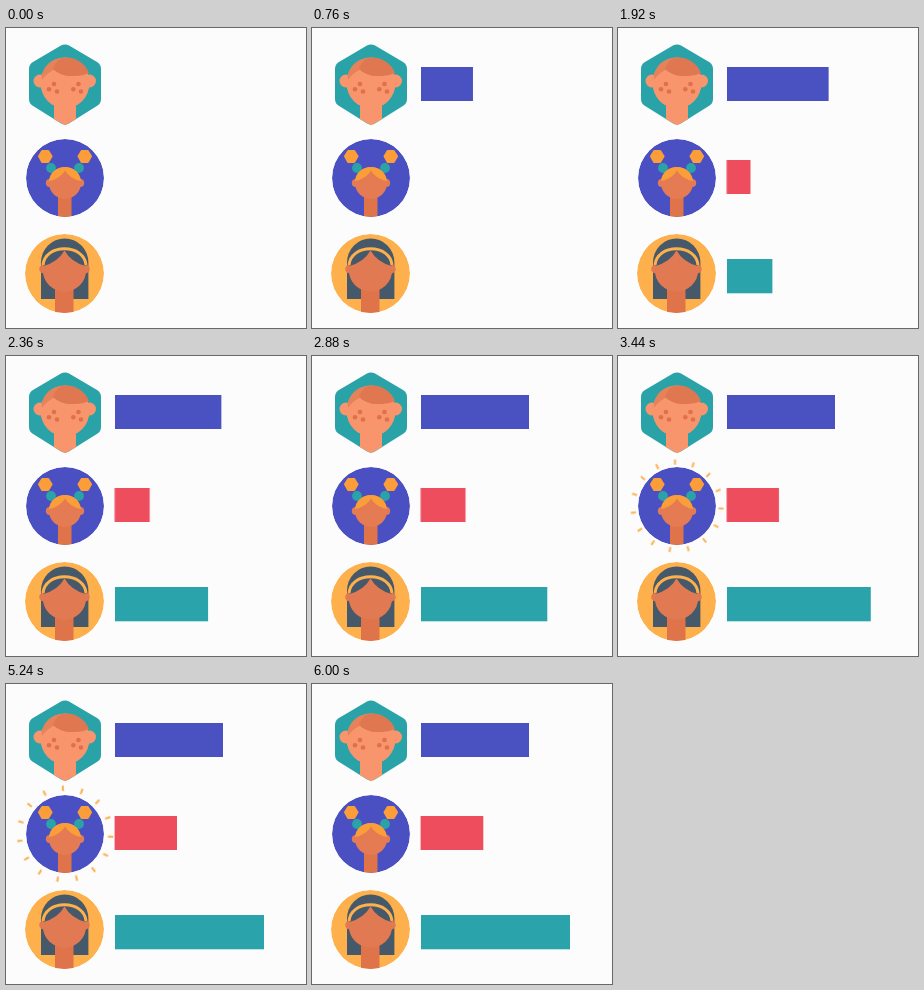
These frames come from a looping animation (300x300 px, 6040 ms). An HTML page:

```html
<!DOCTYPE html>
<html lang="en">
<head>
<meta charset="utf-8">
<title>Avatar bar chart</title>
<style>
  html, body { margin: 0; width: 100%; height: 100%; overflow: hidden; background: #fcfcfc; }
  svg { display: block; width: 100%; height: 100%; }

  .bar, .rays { animation: 6040ms linear infinite both; }
  .bar { transform-box: fill-box; transform-origin: left; }
  .blue { fill: #4a52c2; animation-name: grow-blue; }
  .red { fill: #ee4d5d; animation-name: grow-red; }
  .teal { fill: #2aa3ab; animation-name: grow-teal; }
  .rays {
    fill: none; stroke: #fbb254; stroke-width: 5.2; stroke-dasharray: 1.1 8.9;
    transform-origin: 59px 150px; animation-name: shine;
  }

  @keyframes grow-blue {
    0% { transform: scaleX(0); }
    4.967% { transform: scaleX(0); animation-timing-function: cubic-bezier(.16, .27, .14, 1); }
    47.68%, 100% { transform: scaleX(1); }
  }
  @keyframes grow-red {
    0% { transform: scaleX(0); }
    14.57% { transform: scaleX(0); animation-timing-function: cubic-bezier(.17, .02, .24, 1); }
    94.04%, 100% { transform: scaleX(1); }
  }
  @keyframes grow-teal {
    0% { transform: scaleX(0); }
    23.68% { transform: scaleX(0); animation-timing-function: cubic-bezier(.17, 0, .25, 1); }
    66.72%, 100% { transform: scaleX(1); }
  }
  /* Rays emerge from behind the disc, pulse, then retreat. */
  @keyframes shine {
    0%, 49.67%, 96.03%, 100% { transform: scale(.8) rotate(2deg); }
    52.81%, 61.09%, 69.37%, 77.65%, 85.93%, 94.21% {
      transform: scale(1.04) rotate(2deg); animation-timing-function: ease-in-out;
    }
    56.95%, 65.23%, 73.51%, 81.79%, 90.07% {
      transform: scale(1) rotate(2deg); animation-timing-function: ease-in-out;
    }
  }
</style>
</head>
<body>
<svg viewBox="0 0 300 300">
  <defs>
    <clipPath id="disc-mid"><circle cx="59" cy="150" r="39"/></clipPath>
    <clipPath id="disc-low"><circle cx="58.5" cy="245.5" r="39.5"/></clipPath>
  </defs>

  <rect class="bar blue" x="109" y="39" width="108" height="34"/>
  <rect class="bar red" x="108.6" y="132" width="62.7" height="34"/>
  <rect class="bar teal" x="109" y="231" width="149" height="34.3"/>

  <!-- Hexagon avatar -->
  <g fill="#f8956d">
    <path d="M59 24.5 87 41V71L59 88.5 31 71V41Z" fill="#2aa3a8" stroke="#2aa3a8" stroke-width="16" stroke-linejoin="round"/>
    <path d="M48 70V91.3L59 97.3 70 91.3V70Z"/>
    <circle cx="34" cy="53" r="6.5"/>
    <circle cx="83.5" cy="53" r="6.5"/>
    <ellipse cx="59" cy="55" rx="24.5" ry="25.5"/>
    <path d="M36 51.5C35 41 44 29.5 59 29.5L49 41Q41 45 36 51.5Z" fill="#e5825a"/>
    <path d="M47 41Q55 49 68 48 77 48 83 45C79 35 70 29 59 29.5 53 30 49 35 47 41Z" fill="#df7750"/>
    <g fill="#df7048">
      <circle cx="48" cy="56" r="2.3"/><circle cx="43" cy="61.3" r="2.3"/><circle cx="51" cy="63.5" r="2.3"/>
      <circle cx="72.5" cy="56" r="2.3"/><circle cx="67.3" cy="61.3" r="2.3"/><circle cx="75" cy="63.5" r="2.3"/>
    </g>
  </g>

  <!-- Avatar with buns -->
  <circle class="rays" cx="59" cy="150" r="44" pathLength="150"/>
  <g clip-path="url(#disc-mid)" fill="#e57b53">
    <circle cx="59" cy="150" r="39" fill="#4a50c2"/>
    <g fill="#fb9e3a" stroke="#fb9e3a" stroke-width="2" stroke-linejoin="round">
      <path id="bun" d="M33 128.3 36.2 123H42.2L45.6 128.3 42.2 134H36.2Z"/>
      <use href="#bun" x="39.5"/>
    </g>
    <g fill="#2aa3a8"><circle cx="45" cy="140" r="4.9"/><circle cx="73" cy="140" r="4.9"/></g>
    <path d="M52 166H65.5V190H52Z" fill="#df7349"/>
    <circle cx="43.8" cy="155" r="4"/>
    <circle cx="74.2" cy="155" r="4"/>
    <circle cx="59" cy="155" r="16"/>
    <path d="M43 153C44 144 51 139 59 139S74 144 75 153Q64 151 59 142.5 54 151 43 153Z" fill="#fb9e3a"/>
  </g>

  <!-- Long-haired avatar -->
  <g clip-path="url(#disc-low)" fill="#e17a52">
    <circle cx="58.5" cy="245.5" r="39.5" fill="#fdb04b"/>
    <path d="M35 271V234.5a23.7 24 0 0 1 47.4 0V271Z" fill="#46596b"/>
    <path d="M49 258H67.5V287H49Z" fill="#df734a"/>
    <circle cx="37.5" cy="241" r="4.3"/>
    <circle cx="79.5" cy="241" r="4.3"/>
    <circle cx="58.5" cy="242" r="21.7"/>
    <path d="M37.5 238C38 227 47 220.5 58.5 220.5S79 227 79.5 238Q65 234 58.5 222.5 52 234 37.5 238Z" fill="#46596b"/>
    <path d="M37 237C38 227 47 220.8 58.5 220.8S79 227 80 237" fill="none" stroke="#fdb04b" stroke-width="3"/>
  </g>
</svg>
</body>
</html>
```
